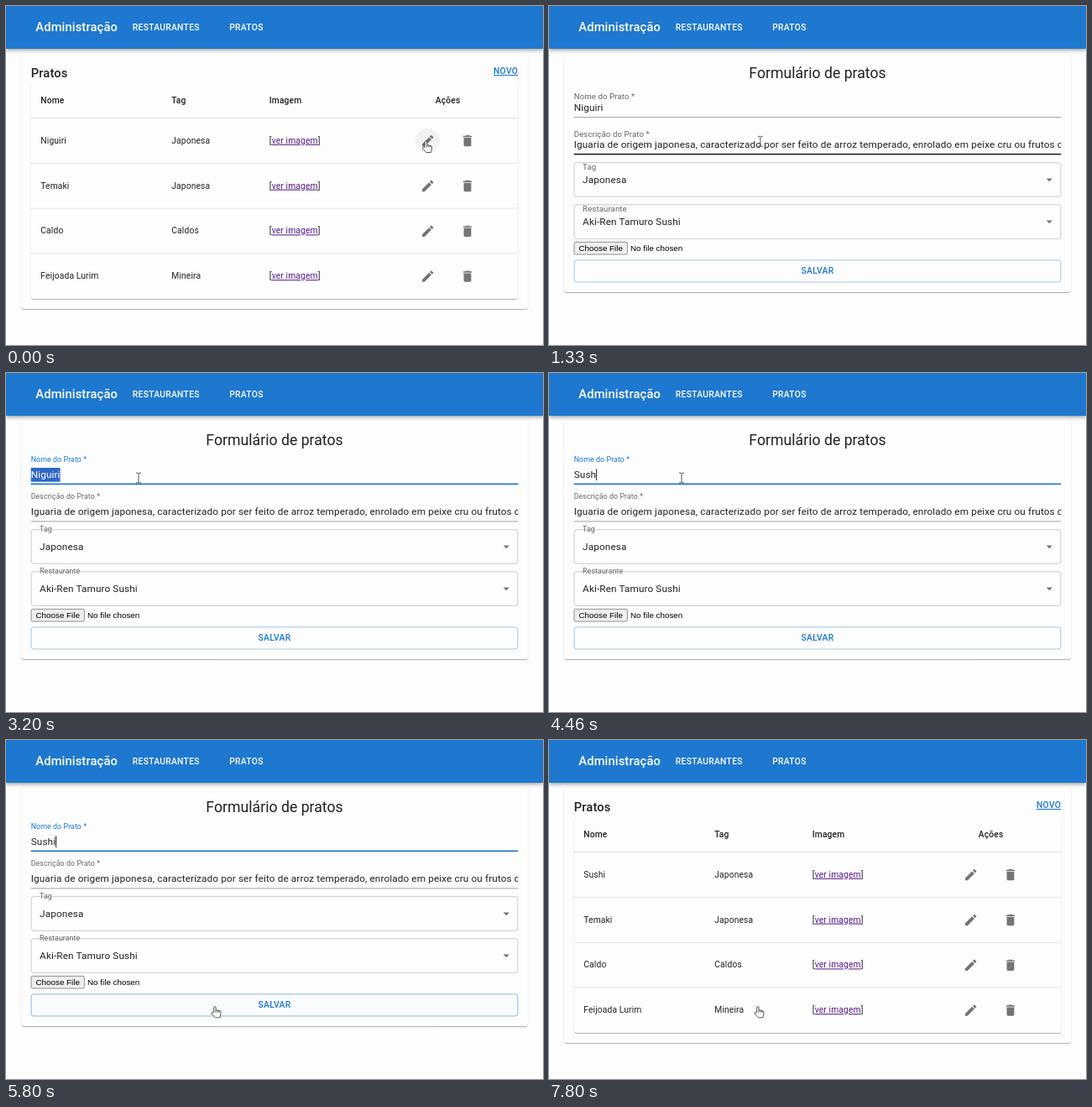
These frames come from a looping animation (640x404 px, 7860 ms). An HTML page:

```html
<!DOCTYPE html>
<html lang="pt-BR">
<head>
<meta charset="utf-8">
<title>Administração</title>
<style>
  html, body { margin: 0; width: 100%; height: 100%; overflow: hidden; background: #fdfdfd; }
  #stage { position: relative; width: 640px; height: 404px; overflow: hidden; background: #fdfdfd; }
  #stage > * { position: absolute; }
  #bar { left: 0; top: 0; width: 640px; height: 50.5px; background: #1e78cf;
    box-shadow: 0 1.5px 3px -.7px #0003, 0 3px 3.7px #00000024, 0 .7px 7.4px #0000001f; }
  .paper { background: #fdfdfd; border-radius: 3px;
    box-shadow: 0 1.5px .7px -.7px #0003, 0 .7px .7px #00000024, 0 .7px 2.2px #0000001f; }
  #card { left: 17.8px; top: 56.4px; width: 604.4px; }
  #table { left: 29.7px; top: 91.8px; width: 580.6px; height: 257px; }
  svg { left: 0; top: 0; }
  text { font-family: Roboto, "Liberation Sans", sans-serif; fill: #222; white-space: pre; }
  .h6 { font-size: 14.74px; font-weight: 500; letter-spacing: .0075em; }
  .h5 { font-size: 17.69px; }
  .btn { font-size: 10.32px; font-weight: 500; letter-spacing: .02857em; }
  .cell { font-size: 10.32px; letter-spacing: .01071em; }
  .head { font-weight: 500; }
  .input, .label { font-size: 11.79px; letter-spacing: .00938em; }
  .label { fill: #666; }
  .native { font-family: "Liberation Sans", Arial, sans-serif; font-size: 9.83px; fill: #000; }
  .white { fill: #fff; }
  .blue { fill: #1976d2; }
  .link { fill: #551a8b; text-decoration: underline; }
  .icon { fill: #000; fill-opacity: .54; }
  .box { fill: none; stroke: #000; stroke-opacity: .25; stroke-width: .8; }
</style>
</head>
<body>
<div id="stage">
  <div id="card" class="paper"></div>
  <div id="table" class="paper"></div>
  <div id="bar"></div>
  <svg id="art" width="640" height="404" viewBox="0 0 640 404"></svg>
</div>
<script>
const LOOP = 7860;
const LEFT = 29.7, RIGHT = 610.3, WIDTH = RIGHT - LEFT;
const OPEN = 920, LOADED = 1262, FOCUS = 2300, SELECT = 2560, PRESS = 6300, BACK = 7250;
const BLUE = '#1976d2';

const PENCIL = 'M3 17.25V21h3.75L17.81 9.94l-3.75-3.75zM20.71 7.04a1 1 0 0 0 0-1.41l-2.34-2.34a1 1 0 0 0-1.41 0l-1.83 1.83 3.75 3.75z';
const TRASH = 'M6 19c0 1.1.9 2 2 2h8c1.1 0 2-.9 2-2V7H6zM19 4h-3.5l-1-1h-5l-1 1H5v2h14z';
const ARROW_DOWN = 'M7 10l5 5 5-5z';

const text = (x, y, cls, str, extra = '') => `<text x="${x}" y="${y}" class="${cls}" ${extra}>${str}</text>`;
const icon = (cx, cy, d) =>
  `<path class="icon" d="${d}" transform="translate(${cx - 8.85} ${cy - 8.85}) scale(.737)"/>`;
const line = (y, h, color, extra = '') =>
  `<rect x="${LEFT}" y="${y - h}" width="${WIDTH}" height="${h}" fill="${color}" ${extra}/>`;
const frame = (y, h, extra = '') =>
  `<rect class="box" x="${LEFT + .4}" y="${y + .4}" width="${WIDTH - .8}" height="${h - .8}" rx="2.9" ${extra}/>`;
const middle = 'text-anchor="middle"';

function row([name, tag], i) {
  const mid = 160.4 + i * 53.8, base = mid + 3.4;
  return text(41.3, base, 'cell', name, i ? '' : 'id="firstDish"')
    + text(197.3, base, 'cell', tag)
    + text(313.8, base, 'cell', '[<tspan class="link">ver imagem</tspan>]')
    + icon(502.7, mid + .3, PENCIL) + icon(550, mid + .3, TRASH)
    + (i < 3 ? line(mid + 27.3, .8, '#dcdcdc') : '');
}

// Input label: resting centre, shrunk centre
const LABELS = [
  { x: LEFT, rest: 120.9, up: 103, str: 'Nome do Prato *' },
  { x: LEFT, rest: 165.1, up: 147.2, str: 'Descrição do Prato *' },
  { x: 40.1, rest: 206.4, up: 185.9, str: 'Tag' },
  { x: 40.1, rest: 256.5, up: 236.1, str: 'Restaurante' },
];

const select = (y, value) => frame(y, 41.3)
  + text(40.1, y + 24.7, 'input value', value) + icon(596.3, y + 20.7, ARROW_DOWN);

const listView = `<g id="list">
  ${text(LEFT, 85.2, 'h6', 'Pratos')}
  ${text(581, 81, 'btn blue', 'NOVO', 'text-decoration="underline"')}
  ${text(41.3, 116.4, 'cell head', 'Nome')}${text(197.3, 116.4, 'cell head', 'Tag')}
  ${text(313.8, 116.4, 'cell head', 'Imagem')}${text(526.6, 116.4, 'cell head', 'Ações', middle)}
  ${line(134, .8, '#dcdcdc')}
  <circle id="hover" cx="502.7" cy="160.6" r="14.7" fill-opacity=".045"/>
  <circle id="tap" cx="502.7" cy="160.6"/>
  ${[['Niguiri', 'Japonesa'], ['Temaki', 'Japonesa'], ['Caldo', 'Caldos'], ['Feijoada Lurim', 'Mineira']].map(row).join('')}
</g>`;

const formView = `<g id="form">
  <clipPath id="field"><rect x="${LEFT}" y="92" width="${WIDTH}" height="90"/></clipPath>
  <clipPath id="button"><rect x="${LEFT}" y="302.5" width="${WIDTH}" height="26.9" rx="2.9"/></clipPath>
  ${text(320, 86, 'h5', 'Formulário de pratos', middle)}
  ${line(133.1, .8, '#8a8a8a')}${line(177.3, .8, '#8a8a8a')}
  ${line(133.1, 1.5, '#222', 'id="over0"')}${line(177.3, 1.5, '#222', 'id="over1"')}
  <rect id="focusLine" y="131.5" height="1.6" fill="${BLUE}"/>
  <rect id="mark" x="${LEFT}" y="113" height="16.6" fill="#2f66c8"/>
  ${text(LEFT, 125.2, 'input value', '', 'id="dish"')}
  <rect id="caret" y="114.4" width=".9" height="13.6" fill="#000"/>
  <g clip-path="url(#field)">${text(LEFT, 169.4, 'input value', 'Iguaria de origem japonesa, caracterizado por ser feito de arroz temperado, enrolado em peixe cru ou frutos do mar')}</g>
  ${select(186.3, 'Japonesa')}${select(236.4, 'Aki-Ren Tamuro Sushi')}
  ${LABELS.map(l => text(0, 0, 'label', l.str)).join('')}
  <rect x="30" y="281.4" width="63.4" height="14.6" rx="1.5" fill="#efefef" stroke="#767676" stroke-width=".8"/>
  ${text(61.7, 292.2, 'native', 'Choose File', middle)}${text(97, 292.2, 'native', 'No file chosen')}
  <g clip-path="url(#button)">
    <rect id="tint" x="${LEFT}" y="302" width="${WIDTH}" height="28" fill="${BLUE}"/>
    <circle id="wave" cx="248" cy="317.5" fill="${BLUE}"/>
  </g>
  ${frame(302.5, 26.9, `id="edge" style="stroke:${BLUE}"`)}
  ${text(320, 319.3, 'btn blue', 'SALVAR', middle)}
</g>`;

// Each pointer is drawn around its hot spot
const pointers = `<g id="pointer">
  <path id="hand" d="M-1.3 7V1a1.2 1.2 0 0 1 2.4 0V4.2q2.8-.1 5.2 1.2 1 .6.7 2.2L6 13H.3L-3.9 8.2Q-4.1 6.3-2.6 6.5Z M1.1 4.2V7M3.4 4.5V7M5.3 5V7" fill="#fff" stroke="#444" stroke-width=".9" stroke-linejoin="round"/>
  <path id="beam" d="M-3-6Q0-6 0-5Q0-6 3-6M0-5V5M-3 6Q0 6 0 5Q0 6 3 6" fill="none" stroke="#555" stroke-width="1"/>
  <path id="arrow" d="M0 0V11L2.6 8.6 4.3 12.3 6 11.5 4.4 8H8Z" fill="#222" stroke="#fff" stroke-width=".8"/>
</g>`;

const art = document.getElementById('art');
art.innerHTML = text(35.3, 30, 'h6 white', 'Administração')
  + text(150.8, 28.7, 'btn white', 'RESTAURANTES') + text(266.2, 28.7, 'btn white', 'PRATOS')
  + listView + formView + pointers;

const $ = id => document.getElementById(id);
const labels = [...art.querySelectorAll('.label')];
const values = [...art.querySelectorAll('.value')];
const show = (el, on) => { el.style.display = on ? '' : 'none'; };
const set = (el, attrs) => { for (const k in attrs) el.setAttribute(k, attrs[k]); };
const ramp = (t, start, span) => Math.min(1, Math.max(0, (t - start) / span));
const easeOut = p => 1 - (1 - p) ** 3;
const mix = (a, b, p) => a + (b - a) * p;
const smooth = p => p * p * (3 - 2 * p);

const MOVES = [
  [0, 500.5, 161.5], [980, 500.5, 161.5], [1330, 252.5, 161.5],
  [1800, 158, 125], [5280, 158, 125], [5750, 249, 317.8], [LOOP, 249, 317.8],
];
const TYPING = [[3820, 'S'], [4030, 'Su'], [4220, 'Sus'], [4400, 'Sush'], [4620, 'Sushi']];

function pointerAt(t) {
  const i = MOVES.findIndex(m => m[0] > t);
  const [t0, x0, y0] = MOVES[i - 1], [t1, x1, y1] = MOVES[i];
  const raw = (t - t0) / (t1 - t0);
  const p = i === 3 ? easeOut(raw) : smooth(raw);
  return [mix(x0, x1, p), mix(y0, y1, p)];
}

function drawForm(t, y) {
  const loaded = t >= LOADED, focused = t >= FOCUS && t < PRESS;
  const shrink = easeOut(ramp(t, LOADED, 200));
  LABELS.forEach((l, i) => {
    const s = mix(1, .75, shrink);
    set(labels[i], { transform: `translate(${l.x} ${mix(l.rest, l.up, shrink) + 4.03 * s}) scale(${s})` });
  });
  const glow = ramp(t, FOCUS, 200) * (1 - ramp(t, 6600, 200));
  labels[0].style.fill = `rgb(${mix(102, 25, glow)},${mix(102, 118, glow)},${mix(102, 210, glow)})`;
  values.forEach(v => show(v, loaded));

  const typed = TYPING.filter(k => k[0] <= t).pop();
  const dish = $('dish'), marked = t >= SELECT && !typed;
  dish.textContent = typed ? typed[1] : 'Niguiri';
  dish.style.fill = marked ? '#fff' : '';
  const end = dish.getComputedTextLength();
  show($('mark'), marked);
  set($('mark'), { width: end });
  const since = t - (typed ? typed[0] : FOCUS);
  show($('caret'), focused && !marked && since % 1000 < 500 || t > 5700 && t < 5900);
  set($('caret'), { x: LEFT + end });

  show($('over0'), y > 109.5 && y < 133 && t < FOCUS);
  show($('over1'), y > 153.7 && y < 177.3);
  const grow = easeOut(ramp(t, FOCUS, 200)) * (1 - easeOut(ramp(t, PRESS, 200)));
  set($('focusLine'), { x: 320 - WIDTH / 2 * grow, width: WIDTH * grow });

  const hover = smooth(ramp(t, 5720, 250));
  set($('tint'), { 'fill-opacity': .045 * hover });
  $('edge').style.strokeOpacity = mix(.5, 1, hover);
  set($('wave'), {
    r: 361 * smooth(ramp(t, PRESS, 360)),
    'fill-opacity': .12 * ramp(t, PRESS, 80) * (1 - ramp(t, 6400, 450)),
  });
}

function render(t) {
  const onForm = t >= OPEN && t < BACK;
  const [x, y] = pointerAt(t);
  show($('list'), !onForm);
  show($('table'), !onForm);
  show($('form'), onForm);
  $('card').style.height = (onForm ? 284.4 : 304.5) + 'px';

  if (onForm) drawForm(t, y);
  else {
    $('firstDish').textContent = t < OPEN ? 'Niguiri' : 'Sushi';
    show($('hover'), t < OPEN);
    set($('tap'), {
      r: 14.7 * easeOut(ramp(t, 560, 300)),
      'fill-opacity': t < OPEN ? .14 * (1 - ramp(t, 680, 350)) : 0,
    });
  }

  const inInput = y > 109.5 && y < 133.1 || y > 153.7 && y < 177.3;
  const overPress = y > 186 && y < 278 || y > 302;
  const kind = !onForm ? 'hand' : inInput ? 'beam' : overPress ? 'hand' : 'arrow';
  for (const id of ['hand', 'beam', 'arrow']) show($(id), id === kind);
  set($('pointer'), { transform: `translate(${x} ${y})` });
}

const start = performance.now();
function tick() {
  render((performance.now() - start) % LOOP);
  requestAnimationFrame(tick);
}
tick();
</script>
</body>
</html>
```
